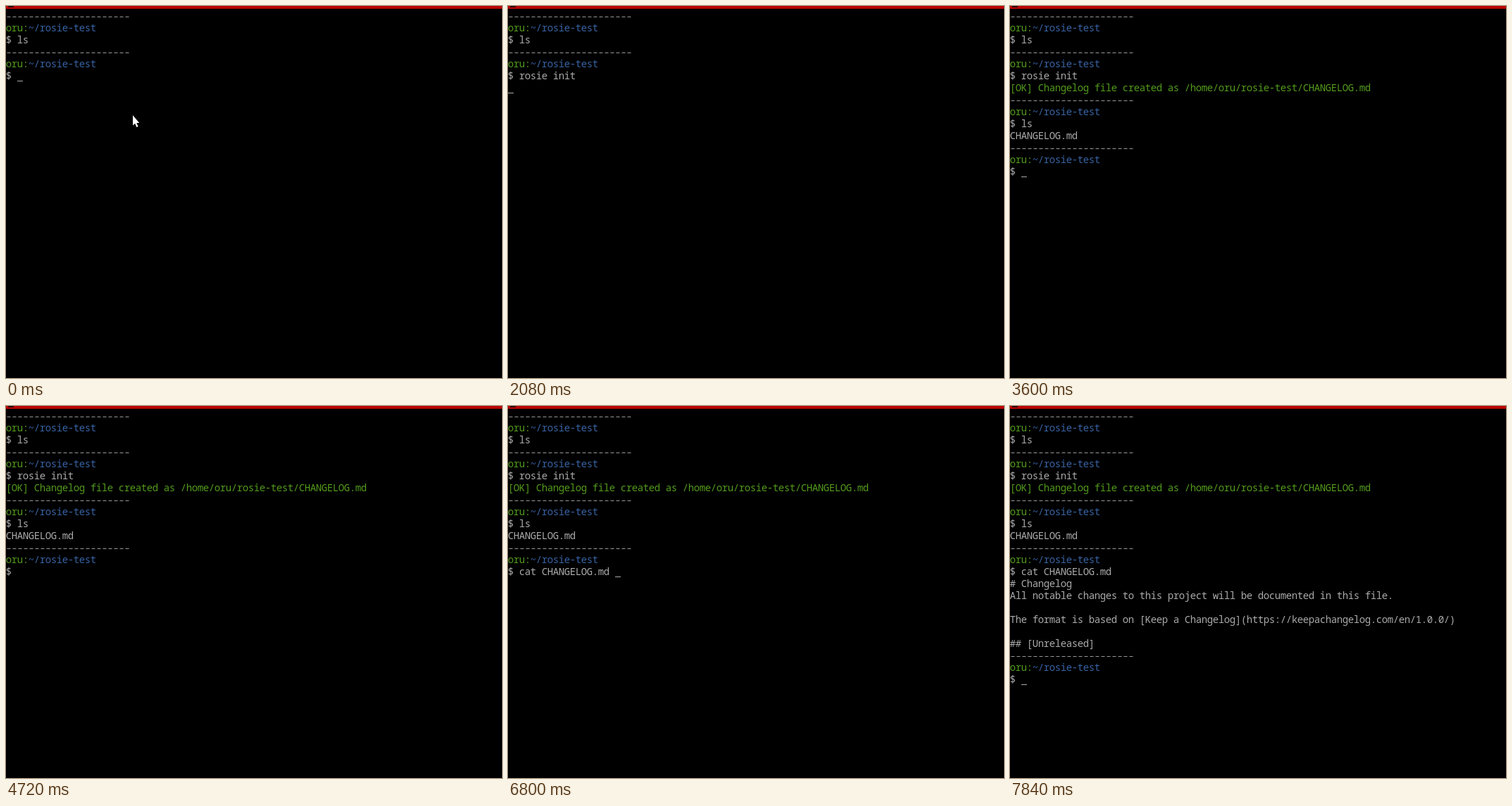
Write an HTML page that moves like this. It is 704 px wide and 528 px high and loops after 8 s.

```html
<!DOCTYPE html>
<html lang="en">
<head>
<meta charset="utf-8">
<title>Terminal</title>
<style>
  html, body { margin: 0; width: 100%; height: 100%; overflow: hidden; background: #000; }
  #stage { position: relative; width: 704px; height: 528px; overflow: hidden; background: #000; }
  #bar { position: absolute; left: 0; top: 0; width: 704px; height: 4px; background: #ba0304; }
  #bar::before { content: ""; position: absolute; left: 3px; top: 0; width: 8px; height: 1.5px; background: #300404; }
  #term { position: absolute; left: 0; top: 5px; color: #aaa;
    font: 14px/17px "Noto Sans Mono", "DejaVu Sans Mono", monospace;
    font-variant-ligatures: none; font-kerning: none; white-space: pre; }
  .row { position: absolute; left: 0; height: 17px; text-indent: -.2px; }
  .rule { width: 176px; overflow: hidden; color: transparent;
    background: repeating-linear-gradient(90deg, transparent 0 1px, #989898 2px 6px, transparent 7px 8px) 0 10px / 176px 1px no-repeat; }
  .ok { color: #529b1c; }
  .dir { color: #3863a4; }
  #cursor { position: absolute; width: 8px; height: 1px; background: #aaa; }
  #pointer { position: absolute; left: 0; top: 0; }
</style>
</head>
<body>
<div id="stage">
  <div id="bar"></div>
  <div id="term"><div id="cursor"></div></div>
  <svg id="pointer" width="704" height="528">
    <path d="M180 155V169.6L183.1 166.8L185.4 172L187.6 171L185.3 165.9H189.2Z" fill="#fff"/>
  </svg>
</div>
<script>
const LOOP = 8000, CELL = 8, LINE = 17;
const $ = id => document.getElementById(id);
const term = $("term"), cursor = $("cursor"), pointer = $("pointer");

// Bring the character pitch to the terminal cell.
const probe = document.createElement("span");
probe.textContent = "m".repeat(80);
term.append(probe);
term.style.letterSpacing = CELL - probe.getBoundingClientRect().width / 80 + "px";
probe.remove();

const rows = [];
function addRow(row, start, html, cls = "") {
  const el = document.createElement("div");
  el.className = "row " + cls;
  el.style.top = row * LINE + "px";
  el.innerHTML = html;
  term.append(el);
  rows.push({ el, start });
  return el;
}
function addPrompt(row, start) {
  addRow(row, start, "-".repeat(22), "rule");
  addRow(row + 1, start, '<span class="ok">oru:</span><span class="dir">~/rosie-test</span>');
  return addRow(row + 2, start, "$ ");
}

addPrompt(0, 0).textContent = "$ ls";
const lines = { 5: addPrompt(3, 0), 9: addPrompt(7, 2400), 13: addPrompt(11, 3600) };
addPrompt(20, 6880);
addRow(6, 2400, "[OK] Changelog file created as /home/oru/rosie-test/CHANGELOG.md", "ok");
addRow(10, 3600, "CHANGELOG.md");
addRow(14, 6880, "# Changelog");
addRow(15, 6880, "All notable changes to this project will be documented in this file.");
addRow(17, 6880, "The format is based on [Keep a Changelog](https://keepachangelog.com/en/1.0.0/)");
addRow(19, 6880, "## [Unreleased]");

// Per command line: [time, text typed so far]
const typing = {
  5: [[0, ""], [160, "r"], [320, "ro"], [720, "rosi"], [800, "rosie"], [1200, "rosie "],
      [1440, "rosie in"], [1680, "rosie init"]],
  9: [[0, ""], [2880, "l"], [2960, "ls"]],
  13: [[0, ""], [5280, "ca"], [5600, "cat"], [6000, "cat "], [6240, "cat C"],
       [6400, "cat CH"], [6800, "cat CHANGELOG.md "]]
};
// [time, row, visible]; the column follows the typed text
const cursorSteps = [
  [0, 5, 1], [2080, 6, 1], [2400, 9, 1], [2480, 9, 0], [2880, 9, 1],
  [3600, 13, 1], [3760, 13, 0], [4240, 13, 1], [4720, 13, 0], [5280, 13, 1],
  [6880, 22, 1], [7360, 22, 0], [7840, 22, 1]
];

const at = (steps, t) => steps.filter(s => s[0] <= t).pop();
const show = (el, on) => { el.style.visibility = on ? "visible" : "hidden"; };

function render(t) {
  for (const r of rows) show(r.el, t >= r.start);
  for (const n in lines) {
    const text = "$ " + at(typing[n], t)[1];
    if (lines[n].textContent !== text) lines[n].textContent = text;
  }
  const [, row, on] = at(cursorSteps, t);
  const col = row === 6 ? 0 : lines[row] ? lines[row].textContent.length : 2;
  cursor.style.left = col * CELL + "px";
  cursor.style.top = row * LINE + 16 + "px";
  show(cursor, on);
  show(pointer, t < 240);
}

function tick() {
  render(performance.now() % LOOP);
  requestAnimationFrame(tick);
}
tick();
</script>
</body>
</html>
```
